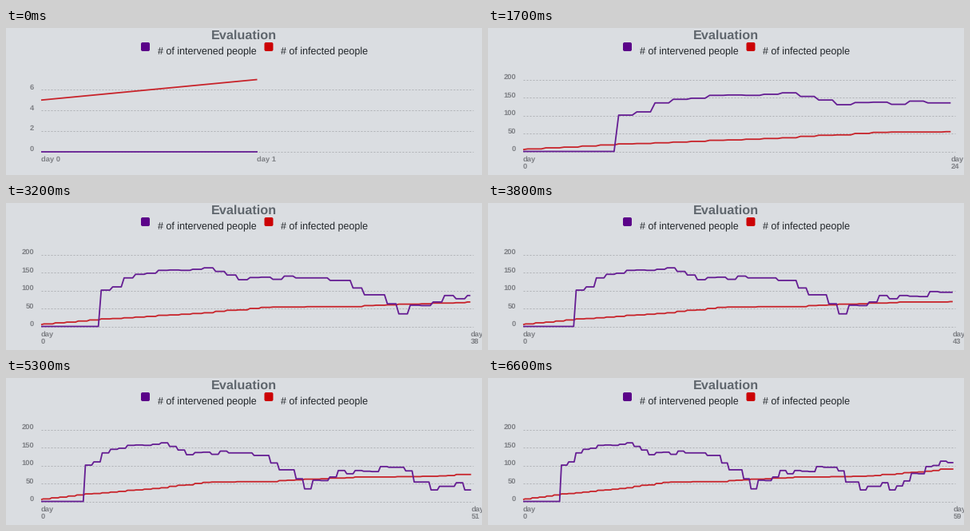
A matplotlib script that plays this animation: 596 by 184 pixels, repeating every 7300 ms.

```python
import math

import matplotlib.pyplot as plt
import numpy as np
from matplotlib.animation import FuncAnimation
from matplotlib.patches import FancyBboxPatch

plt.rcParams["font.family"] = "Liberation Sans"
plt.rcParams["text.hinting"] = "none"

W, H, DPI = 596, 184, 100
PX = 72 / DPI
FRAMES, INTERVAL = 73, 100
LEFT, RIGHT, TOP, BASE = 44, 585, 64.5, 154.5
BG, GRID, LABEL = "#dadde1", "#b0b2b6", "#7d7f84"
PURPLE, RED = "#651d93", "#c8232a"

# Daily totals; each day holds four samples after the single one of day 0.
INFECTED = [5, 7, 10, 12, 15, 18, 21, 22, 24, 26, 28, 31, 32, 34, 36, 38,
            42, 45, 46, 50, 53, 54, 54, 54, 55, 55, 55, 55, 55, 58, 59, 60,
            62, 62, 63, 65, 65, 66, 68, 68, 68, 68, 68, 69, 69, 69, 70, 70,
            71, 72, 75, 75, 77, 80, 81, 82, 84, 86, 90, 90]
INTERVENED = [0, 0, 0, 0, 0, 0, 101, 110, 135, 145, 148, 156, 157, 156, 159,
              163, 153, 143, 130, 136, 137, 131, 140, 135, 135, 135, 128, 128,
              107, 88, 88, 63, 35, 59, 58, 68, 86, 77, 86, 84, 83, 97, 95, 95,
              85, 54, 54, 32, 42, 42, 52, 32, 43, 57, 78, 77, 97, 100, 112, 108]

# Number of samples on the chart over time
KEY_FRAMES = [0, 9, 16, 17, 18, 25, 32, 43, 44, 45, 53, 63, 65, 66, 72]
KEY_COUNTS = [2, 60, 94, 95, 95, 120, 151, 187, 187, 189, 205, 236, 236, 237, 237]


def day_of(k):
    return (k + 3) // 4


def scale(high):
    """Rounded axis maximum and a tick step at least 20 px apart."""
    step = 10 ** math.floor(math.log10(high))
    top = math.ceil(high / step) * step
    unit = (BASE - TOP) / top
    if step * unit < 20:
        while step * unit <= 20:
            step *= 2
    else:
        while step / 2 * unit >= 20:
            step /= 2
    return top, step


fig = plt.figure(figsize=(W / DPI, H / DPI), dpi=DPI, facecolor=BG)
ax = fig.add_axes([0, 0, 1, 1])
ax.set_xlim(0, W)
ax.set_ylim(H, 0)
ax.axis("off")


def write(x, y, s, size, color, **kw):
    return ax.text(x, y, s, fontsize=size * PX, color=color, va="baseline", **kw)


def axis_label(ha="left"):
    return write(0, 0, "", 9.4, LABEL, weight="bold", ha=ha)


def legend_item(x, text_x, color, s):
    ax.add_patch(FancyBboxPatch((x + 1.5, 19.5), 8, 8, fc=color, ec="none",
                                boxstyle="round,pad=1.5,rounding_size=2"))
    write(text_x, 33, s, 12.55, "#212529")


write(298, 14, "Evaluation", 16.3, "#5f666d", weight="bold", ha="center")
legend_item(169, 189.7, "#5b0289", "# of intervened people")
legend_item(323.5, 344, "#cc0205", "# of infected people")

grid = [ax.plot([], [], color=GRID, lw=PX, ls=(0, (2, 2)),
                dash_capstyle="butt")[0] for _ in range(10)]
ticks = [axis_label("right") for _ in grid]
red, = ax.plot([], [], color=RED, lw=1.8 * PX, solid_capstyle="butt")
purple, = ax.plot([], [], color=PURPLE, lw=1.8 * PX, solid_capstyle="butt")
day_labels = [(axis_label(), axis_label()) for _ in range(2)]


def set_text(item, x, y, s):
    item.set_position((x, y))
    item.set_text(s)


def draw(frame):
    n = int(round(np.interp(frame, KEY_FRAMES, KEY_COUNTS)))
    k = np.arange(n)
    pitch = (RIGHT - LEFT) / n
    x = LEFT + pitch * k
    infected = np.array(INFECTED)[day_of(k)]
    intervened = np.array(INTERVENED)[day_of(k)]
    top, step = scale(max(infected.max(), intervened.max()))
    unit = (BASE - TOP) / top
    red.set_data(x, BASE - infected * unit)
    purple.set_data(x, BASE - intervened * unit)

    for i, (line, tick) in enumerate(zip(grid, ticks)):
        shown = i * step <= top
        y = BASE - i * step * unit
        line.set_data([LEFT, RIGHT] if shown else [], [y, y] if shown else [])
        set_text(tick, 35, y - 0.5, f"{i * step:g}" if shown else "")

    for (first, second), j in zip(day_labels, (0, n - 1)):
        day = str(day_of(j))
        wrap = pitch < 19 + 5.3 * len(day)
        set_text(first, x[j], 167, "day" if wrap else "day " + day)
        set_text(second, x[j], 176.3, day if wrap else "")
    return []


anim = FuncAnimation(fig, draw, frames=FRAMES, interval=INTERVAL,
                     init_func=lambda: draw(0), repeat=True, repeat_delay=0)
plt.show()
```
